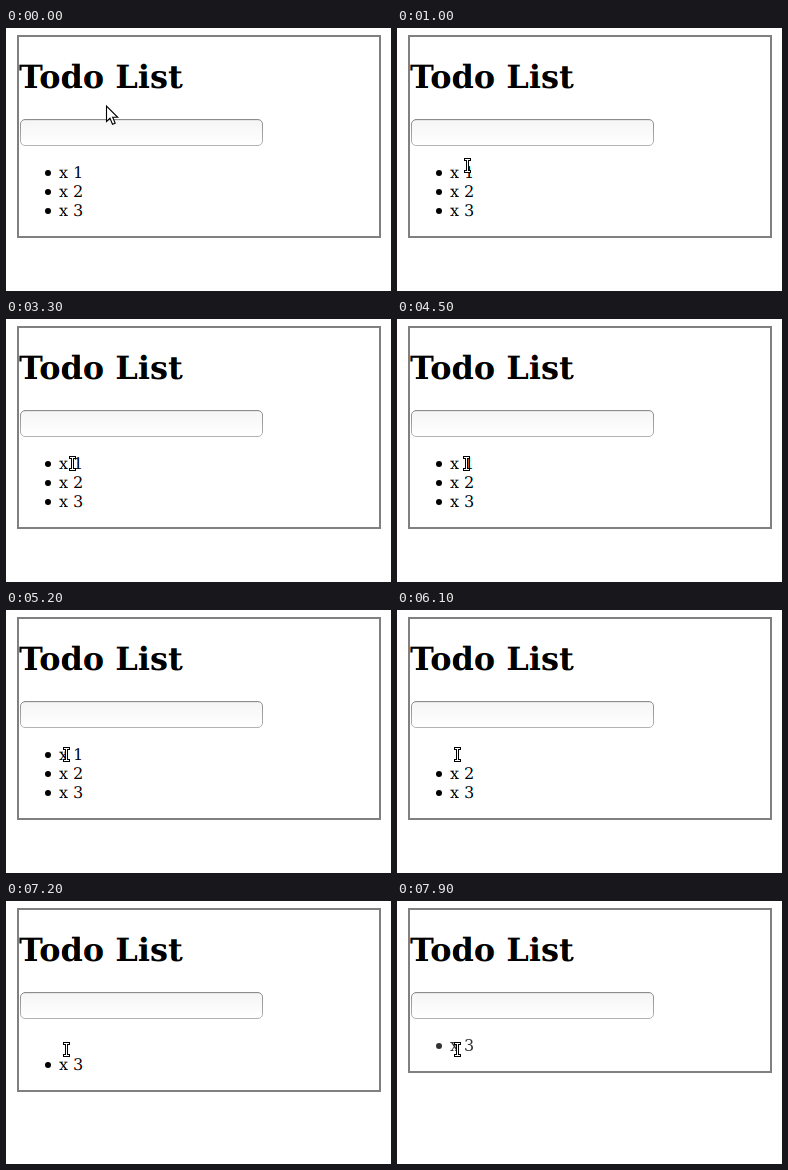
Write an HTML page with a canvas that moves like this. It is 385 px wide and 263 px high and loops after 8 s.

```html
<!DOCTYPE html>
<html lang="en">
<head>
<meta charset="utf-8">
<title>Todo List</title>
<style>
html, body { margin: 0; width: 100%; height: 100%; overflow: hidden; background: #fff; }
canvas { display: block; }
</style>
</head>
<body>
<canvas id="stage" width="385" height="263"></canvas>
<script>
const ctx = document.getElementById('stage').getContext('2d');
const LOOP = 8000, STEP = 100, ROW = 19, FADE = 400;
const SERIF = '"DejaVu Serif", "Noto Serif", serif';

// pointer moves: [start, end, x, y]
const moves = [
  [300, 1200, 68, 146], [1200, 1400, 64, 149], [1700, 1900, 62, 149], [2300, 2500, 62, 147],
  [2800, 3600, 70, 144], [4800, 5200, 61, 144], [6400, 6600, 61, 148]
];

// each item fades from its click on, then its row closes
const items = [5700, 6800, 7800].map((click, i) => ({ label: 'x ' + (i + 1), click, gone: click + 500 }));
const hover = { from: 3700, to: 4500 };

function swing(k) {
  return 0.5 - Math.cos(Math.PI * Math.min(1, Math.max(0, k))) / 2;
}

function pointerAt(t) {
  let x = 100, y = 77;
  for (const [from, to, tx, ty] of moves) {
    const k = swing((t - from) / (to - from));
    x += (tx - x) * k;
    y += (ty - y) * k;
  }
  return [Math.floor(x), Math.floor(y)];
}

function plainText(str, x, y) {
  ctx.textRendering = 'auto';
  ctx.fillStyle = '#000';
  ctx.fillText(str, x, y);
}

// subpixel smoothing: each colour channel is a third of a pixel apart
function crispText(str, x, y) {
  ctx.textRendering = 'geometricPrecision';
  ctx.globalCompositeOperation = 'multiply';
  ['#ff0', '#f0f', '#0ff'].forEach((color, i) => {
    ctx.fillStyle = color;
    ctx.fillText(str, x + (i - 1) / 3, y);
  });
  ctx.globalCompositeOperation = 'source-over';
}

function gradient(y0, y1, from, to) {
  const g = ctx.createLinearGradient(0, y0, 0, y1);
  g.addColorStop(0, from);
  g.addColorStop(1, to);
  return g;
}

function field() {
  ctx.beginPath();
  ctx.roundRect(14.5, 91.5, 242, 26, 4.5);
  ctx.fillStyle = gradient(92, 117, '#f5f5f5', '#ffffff');
  ctx.fill();
  ctx.fillStyle = '#e6e6e6';
  ctx.fillRect(17, 92, 237, 1);
  ctx.lineWidth = 1;
  ctx.strokeStyle = gradient(91, 118, '#8c8c8c', '#b4b4b4');
  ctx.stroke();
}

function list(t) {
  const shown = items.filter(item => t < item.gone);
  ctx.font = '16px ' + SERIF;
  shown.forEach((item, row) => {
    const y = 150 + ROW * row;
    const hovered = item === items[0] && t >= hover.from && t < hover.to;
    const fading = t >= item.click;
    ctx.globalAlpha = fading ? 1 - swing((t - item.click + 15) / FADE) : 1;
    (fading || hovered ? plainText : crispText)(item.label, 53, y);
    ctx.fillStyle = '#000';
    ctx.beginPath();
    ctx.arc(42, y - 5, 3, 0, Math.PI * 2);
    ctx.fill();
    ctx.globalAlpha = 1;
  });
  return shown.length;
}

function arrow(x, y) {
  const pts = [[0.5, 1], [0.5, 16.5], [4, 13.3], [6.5, 19.3], [9.2, 18.2], [6.7, 12.3], [11.7, 12.3]];
  ctx.beginPath();
  pts.forEach(([dx, dy]) => ctx.lineTo(x + dx, y + dy));
  ctx.closePath();
  ctx.fillStyle = '#fff';
  ctx.fill();
  ctx.lineWidth = 1.1;
  ctx.strokeStyle = '#000';
  ctx.stroke();
}

function beam(cx, cy) {
  const x = cx - 0.5, top = cy - 5.5, end = cy + 6.5;
  ctx.beginPath();
  for (const y of [top, end]) {
    ctx.moveTo(x - 2, y);
    ctx.lineTo(x + 2, y);
  }
  ctx.moveTo(x, top);
  ctx.lineTo(x, end);
  ctx.lineCap = 'square';
  for (const [color, width] of [['#000', 3], ['#fff', 1]]) {
    ctx.strokeStyle = color;
    ctx.lineWidth = width;
    ctx.stroke();
  }
}

function draw(t) {
  ctx.fillStyle = '#fff';
  ctx.fillRect(0, 0, 385, 263);
  ctx.font = 'bold 32px ' + SERIF;
  crispText('Todo List', 13, 60);
  field();
  const rows = list(t);
  ctx.lineWidth = 2;
  ctx.strokeStyle = '#808080';
  ctx.strokeRect(12, 8, 362, 144 + ROW * rows);
  const [x, y] = pointerAt(t);
  const overText = (y >= 91 && y < 118) || y >= 135;
  (overText ? beam : arrow)(x, y);
}

const start = performance.now();
function tick() {
  const t = (performance.now() - start) % LOOP;
  draw(Math.floor(t / STEP) * STEP);
  requestAnimationFrame(tick);
}
tick();
</script>
</body>
</html>
```
